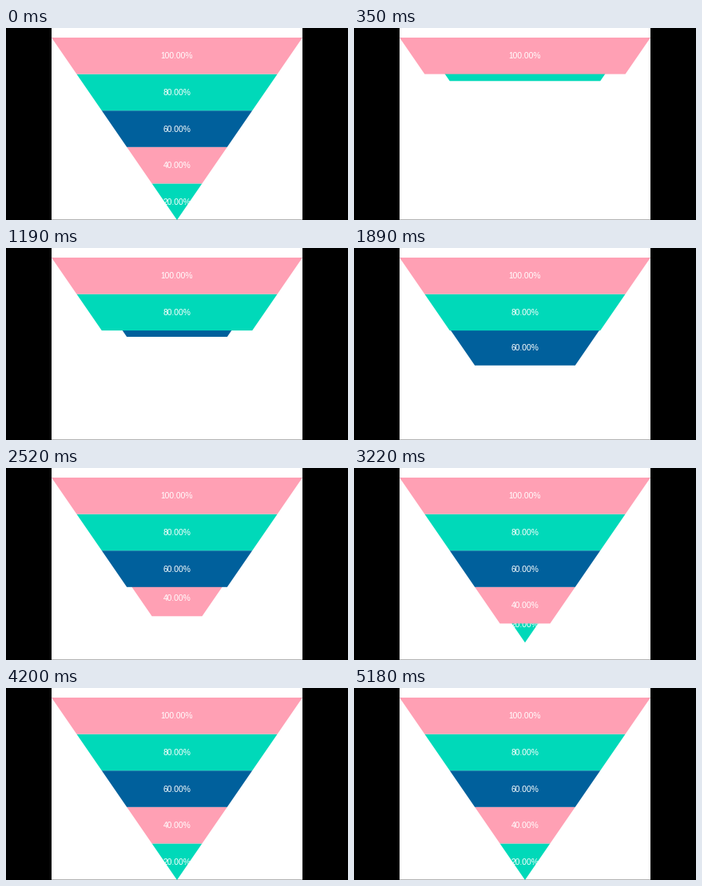
These frames come from a looping animation (428x240 px, 5.25 s). A matplotlib script:

```python
import math

import matplotlib.pyplot as plt
from matplotlib.animation import FuncAnimation
from matplotlib.patches import Polygon, Rectangle

W, H, DPI = 428, 240, 100
STEP, FRAMES = 70, 75          # ms per frame, frames per loop

LEFT, RIGHT = 57, 371
TOP, TIP = 12, 240
MID = (LEFT + RIGHT) / 2
BAND = (TIP - TOP) / 5
PINK, GREEN, BLUE = "#ffa0b4", "#00d9b9", "#00609c"
COLORS = [PINK, GREEN, BLUE, PINK, GREEN]

STARTS = [None, 228, 1080, 1930, 2870]   # ms at which each band slides out
SLIDE = 1000

fig = plt.figure(figsize=(W / DPI, H / DPI), dpi=DPI, facecolor="black")
ax = fig.add_axes([0, 0, 1, 1])
ax.set_xlim(0, W)
ax.set_ylim(H, 0)
ax.axis("off")

ax.add_patch(Rectangle((LEFT, 0), RIGHT - LEFT, H, fc="white", lw=0, zorder=0))
ax.add_patch(Rectangle((LEFT, H - 1), RIGHT - LEFT, 1, fc="#b4b4b4", lw=0,
                       zorder=0.5))


def band_points(k, shift=0.0):
    """Corners of band k of the funnel, moved vertically by shift."""
    y0, y1 = TOP + k * BAND, TOP + (k + 1) * BAND
    half = (RIGHT - LEFT) / 2
    w0, w1 = half * (1 - k / 5), half * (1 - (k + 1) / 5)
    return [(MID - w0, y0 + shift), (MID + w0, y0 + shift),
            (MID + w1, y1 + shift), (MID - w1, y1 + shift)]


def label_y(k):
    return TOP + (k + 0.5) * BAND + 0.6


bands, labels = [], []
for k, color in enumerate(COLORS):
    z = 20 - 2 * k             # upper bands cover lower ones
    band = Polygon(band_points(k), closed=True, fc=color, lw=0, zorder=z)
    ax.add_patch(band)
    bands.append(band)
    labels.append(ax.text(MID - 0.3, label_y(k), f"{100 - 20 * k}.00%",
                          color="white", fontsize=10.2 * 72 / DPI,
                          family="Liberation Sans", ha="center", va="center",
                          zorder=z + 0.5))


def progress(k, t):
    """Eased share of the slide done at time t; None while still hidden."""
    if k == 0 or t == 0:
        return 1.0
    u = (t - STARTS[k]) / SLIDE
    if u <= 0:
        return None
    return math.sin(min(u, 1) * math.pi / 2)


def draw(i):
    t = i * STEP
    for k, (band, label) in enumerate(zip(bands, labels)):
        p = progress(k, t)
        band.set_visible(p is not None)
        label.set_visible(p is not None)
        if p is not None:
            shift = -BAND * (1 - p)
            band.set_xy(band_points(k, shift))
            label.set_y(label_y(k) + shift)
    return bands + labels


anim = FuncAnimation(fig, draw, frames=FRAMES, interval=STEP, repeat=True,
                     repeat_delay=0, blit=False)
plt.show()
```
